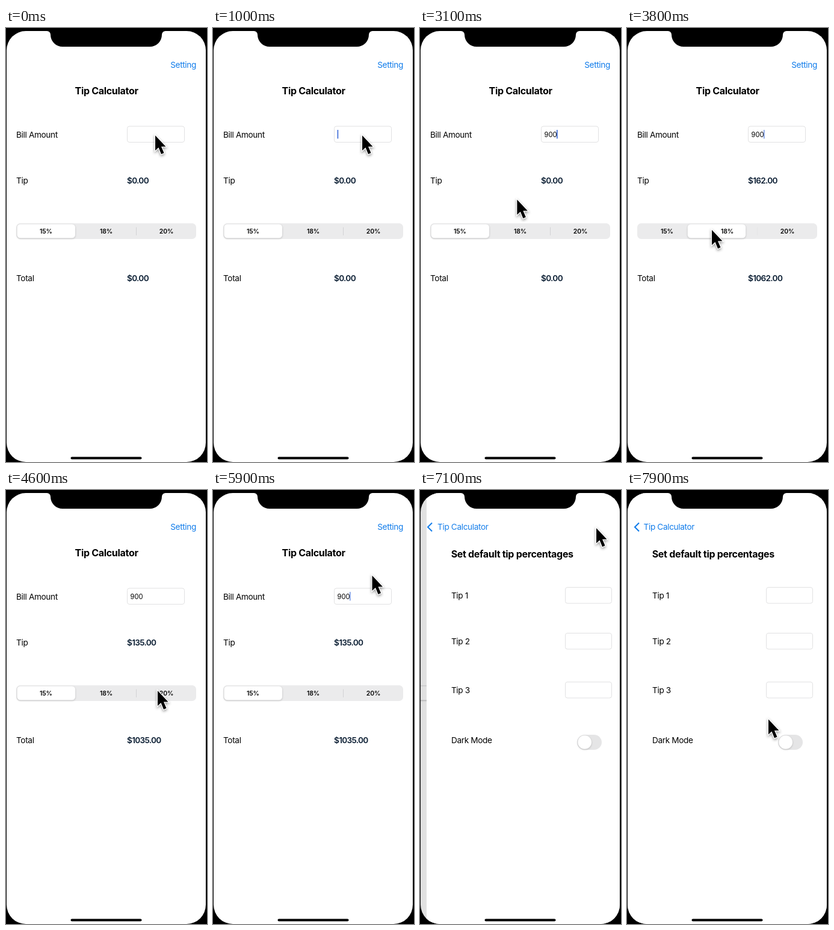
Recreate the animation shown at these times as an HTML page. Size 334 by 720 pixels, loop 8 s.

```html
<!DOCTYPE html>
<html lang="en">
<head>
<meta charset="utf-8">
<title>Tip Calculator</title>
<style>
  html, body { margin: 0; width: 100%; height: 100%; overflow: hidden; background: #000; }
  svg { display: block; }
  text { font: 13.6px Inter, Roboto, sans-serif; letter-spacing: -.025em; }
  .title { font-size: 16px; font-weight: 700; letter-spacing: -.019em; }
  .value { font-weight: 600; fill: #0a1d32; letter-spacing: -.05em; }
  .segment { font-size: 10.4px; font-weight: 600; text-anchor: middle; letter-spacing: -.01em; }
  .entry { font-size: 11.2px; letter-spacing: 0; }
  .link { fill: #0f7bea; }
  .field { fill: #fff; stroke: #e1e1e2; }
  .thumb { fill: #fff; filter: drop-shadow(0 1px 1.5px rgba(0,0,0,.2)); }
  #pointer { filter: drop-shadow(0 2px 2px rgba(0,0,0,.4)); }
</style>
</head>
<body>
<svg width="334" height="720" viewBox="0 0 334 720">
  <clipPath id="screen"><rect x="1" y="5" width="331" height="715" rx="32"/></clipPath>
  <rect width="334" height="720"/>
  <g clip-path="url(#screen)">
    <rect width="334" height="720" fill="#fff"/>
    <g id="main">
      <text class="title" x="114.5" y="110">Tip Calculator</text>
      <text x="17" y="181.5">Bill Amount</text>
      <text x="17" y="257.5">Tip</text>
      <text x="17" y="420">Total</text>
      <rect class="field" x="201.5" y="163" width="95" height="26.5" rx="3.5"/>
      <text class="entry" id="bill" x="206.5" y="180.5"></text>
      <rect id="caret" y="169" width="1.6" height="14.5" fill="#3566d6"/>
      <text class="value" id="tip" x="201" y="257.5"></text>
      <text class="value" id="total" x="201" y="420"></text>
      <rect x="17" y="324" width="299" height="26" rx="6.5" fill="#ebebec"/>
      <path id="divider" d="M216.5 330.5v13.5" stroke="#d2d2d4"/>
      <rect class="thumb" id="thumb" x="18.5" y="325.5" width="96.5" height="23" rx="5.5"/>
      <text class="segment" x="66.5" y="341">15%</text>
      <text class="segment" x="166.5" y="341">18%</text>
      <text class="segment" x="266.5" y="341">20%</text>
    </g>
    <rect id="dim" width="334" height="720"/>
    <g id="settings">
      <rect x="1" width="333" height="720" fill="#fff"/>
      <text class="title" x="41.7" y="111.5">Set default tip percentages</text>
      <text x="42" y="180">Tip 1</text>
      <text x="42" y="256">Tip 2</text>
      <text x="42" y="337">Tip 3</text>
      <text x="42" y="419.5">Dark Mode</text>
      <rect class="field" x="231.5" y="161.5" width="77" height="26.5" rx="3.5"/>
      <rect class="field" x="231.5" y="237.5" width="77" height="26.5" rx="3.5"/>
      <rect class="field" x="231.5" y="318.5" width="77" height="26.5" rx="3.5"/>
      <rect x="251" y="406" width="41" height="25" rx="12.5" fill="#e5e5e6"/>
      <circle class="thumb" cx="263.7" cy="418.5" r="11.3"/>
    </g>
    <text class="link" id="settingLink" x="316" y="66" text-anchor="end">Setting</text>
    <g id="back">
      <path d="M20 54.5l-7 7 7 7" fill="none" stroke="#0f7bea" stroke-width="2.1"/>
      <text class="link" id="backText" x="27.5" y="66">Tip Calculator</text>
    </g>
  </g>
  <path d="M68 0V5A6 6 0 0 1 74 11A20 20 0 0 0 94 31H239A20 20 0 0 0 259 11A6 6 0 0 1 265 5V0Z"/>
  <rect x="107.5" y="711.5" width="118" height="4" rx="2"/>
  <path id="pointer" d="M0 0V25L5.5 20 10 31 14.5 29 10 18.5H17.5Z"
    stroke="#fff" stroke-width="2.6" paint-order="stroke"/>
</svg>
<script>
const LOOP = 8000, STEP = 100;
const $ = id => document.getElementById(id);
const set = (id, attrs) => {
  for (const name in attrs) $(id).setAttribute(name, attrs[name]);
};

// time, x, y of the pointer tip
const route = [
  [0, 248, 178.3], [2700, 248, 178.3], [3300, 118, 338], [3600, 141, 335], [3850, 141, 335],
  [4150, 70, 335], [4250, 70, 335], [4500, 252, 333], [5300, 252, 333],
  [5900, 264.5, 142], [6200, 291, 75], [6400, 293, 63.3], [7250, 293, 63.3],
  [7500, 190, 101], [7600, 138, 119], [7700, 138, 119], [7900, 235, 380.5], [8000, 235, 380.5]
];

function pointerAt(t) {
  const i = route.findIndex(p => p[0] > t);
  const [t0, x0, y0] = route[i - 1], [t1, x1, y1] = route[i];
  const k = (t - t0) / (t1 - t0);
  return [x0 + (x1 - x0) * k, y0 + (y1 - y0) * k];
}

// Critically damped spring from 0 to 1
function spring(ms, rate) {
  const x = Math.max(0, ms) / 1000 * rate;
  return 1 - Math.exp(-x) * (1 + x);
}

function caretAlpha(t) {
  if (t < 200) return 0;
  if (t < 800 || (t >= 1300 && t < 2400)) return 1;
  const phase = t % 1000;
  if (phase < 400) return 1;
  if (phase < 500) return .45;
  if (phase < 800) return 0;
  return .65;
}

function draw(t) {
  const typed = '900'.slice(0, (t >= 1300) + (t >= 1700) + (t >= 2000));
  const rate = t < 3700 ? 0 : t < 4200 ? .18 : .15;
  const tip = 900 * rate;
  $('bill').textContent = typed;
  $('tip').textContent = '$' + tip.toFixed(2);
  $('total').textContent = '$' + (rate ? 900 + tip : 0).toFixed(2);
  set('caret', { x: 206.6 + 6.8 * typed.length, opacity: caretAlpha(t) });

  const slide = spring(t - 3650, 21) - spring(t - 4150, 21);
  set('thumb', { x: 18.5 + 100 * slide });
  set('divider', { opacity: 1 - slide });

  const push = spring(t - 6650, 11.9), rest = 1 - push;
  set('main', { transform: `translate(${-99 * push})` });
  set('dim', { opacity: .12 * push });
  set('settings', { transform: `translate(${331 * rest})` });
  set('settingLink', { opacity: t === 6500 ? .4 : Math.max(0, 1 - 2 * push) });
  set('back', { opacity: push });
  set('backText', { x: 27.5 + 50 * rest });
  set('pointer', { transform: `translate(${pointerAt(t)})` });
}

let start;
function frame(now) {
  start ??= now;
  const t = (now - start + 10) % LOOP;
  draw(Math.floor(t / STEP) * STEP);
  requestAnimationFrame(frame);
}
draw(0);
requestAnimationFrame(frame);
</script>
</body>
</html>
```
